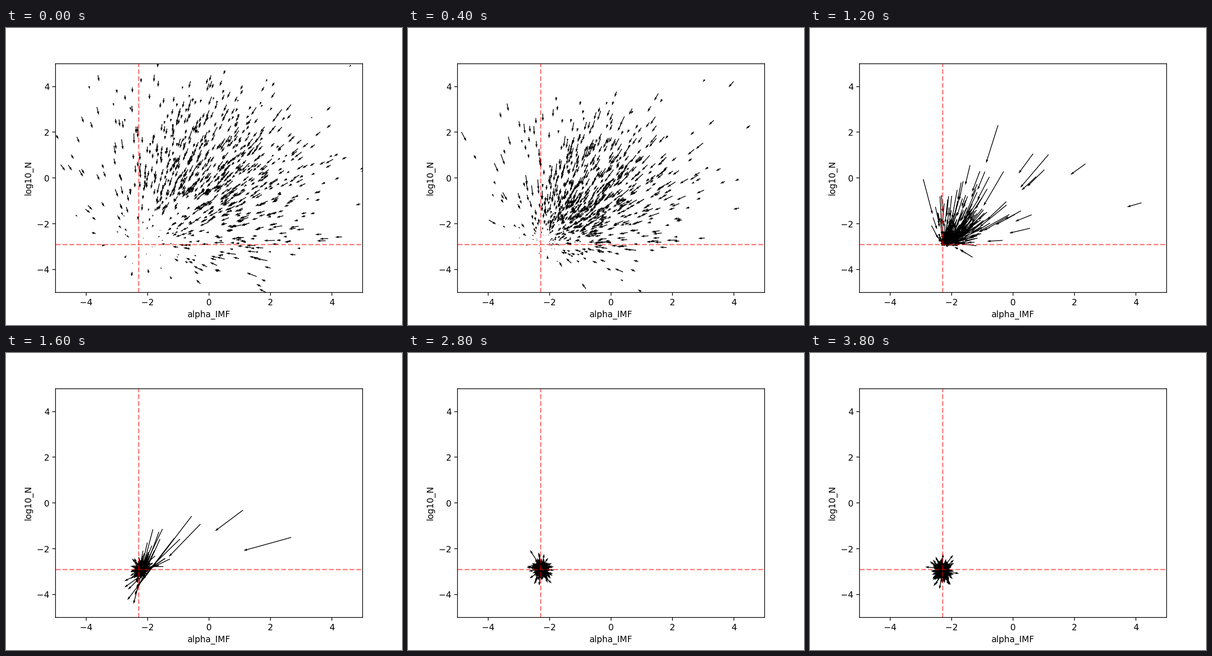
Animation, 864 px wide and 648 px high, one loop 4 s. Source, as a matplotlib script:

```python
import matplotlib.pyplot as plt
import numpy as np
from matplotlib.animation import FuncAnimation

FRAMES, INTERVAL = 20, 200
COUNT = 900
TRUTH = np.array([-2.3, -2.9])
LATECOMER = [6.76, -0.38]
JITTER = 0.052


def best(k):
    """Best point the swarm knows; it drifts a little while settling."""
    drift = np.clip((k - 10) / 9, 0, 1)
    return TRUTH + np.array([0.06 * (1 - drift), 0.04 - 0.08 * drift])


def simulate():
    rng = np.random.default_rng(12)
    pos = rng.normal([0.1, 0], 1.85, (COUNT, 2))
    pace = rng.uniform(0.75, 1.25, (COUNT, 1))
    pos[0], pace[0] = LATECOMER, 0.58
    states = []
    for k in range(FRAMES):
        luck = rng.uniform(0.5, 1.5, (COUNT, 1))
        luck[0] = 1
        goal = best(k) + rng.normal(0, JITTER, pos.shape)
        gap = goal - pos
        dist = np.hypot(*gap.T)[:, None]
        # The pull grows with time and weakens with distance
        pull = 0.65 * min(0.5 + 0.1 * k, 1.5) / (1 + (dist / 4) ** 2)
        vel = pace * luck * pull * gap
        states.append((pos, vel))
        pos = pos + vel
    return states


states = simulate()
fig, ax = plt.subplots(figsize=(6.4, 4.8), dpi=135)
ax.set(xlim=(-5, 5), ylim=(-5, 5), xlabel="alpha_IMF", ylabel="log10_N")
ax.axvline(TRUTH[0], color="red", ls="--", alpha=0.5)
ax.axhline(TRUTH[1], color="red", ls="--", alpha=0.5)
arrows = []


def update(k):
    while arrows:
        arrows.pop().remove()
    pos, vel = states[k]
    # A fresh quiver rescales its arrows to the current mean speed
    arrows.append(ax.quiver(*pos.T, *vel.T))
    return arrows


anim = FuncAnimation(fig, update, frames=FRAMES, interval=INTERVAL,
                     repeat=True, repeat_delay=0)
plt.show()
```
